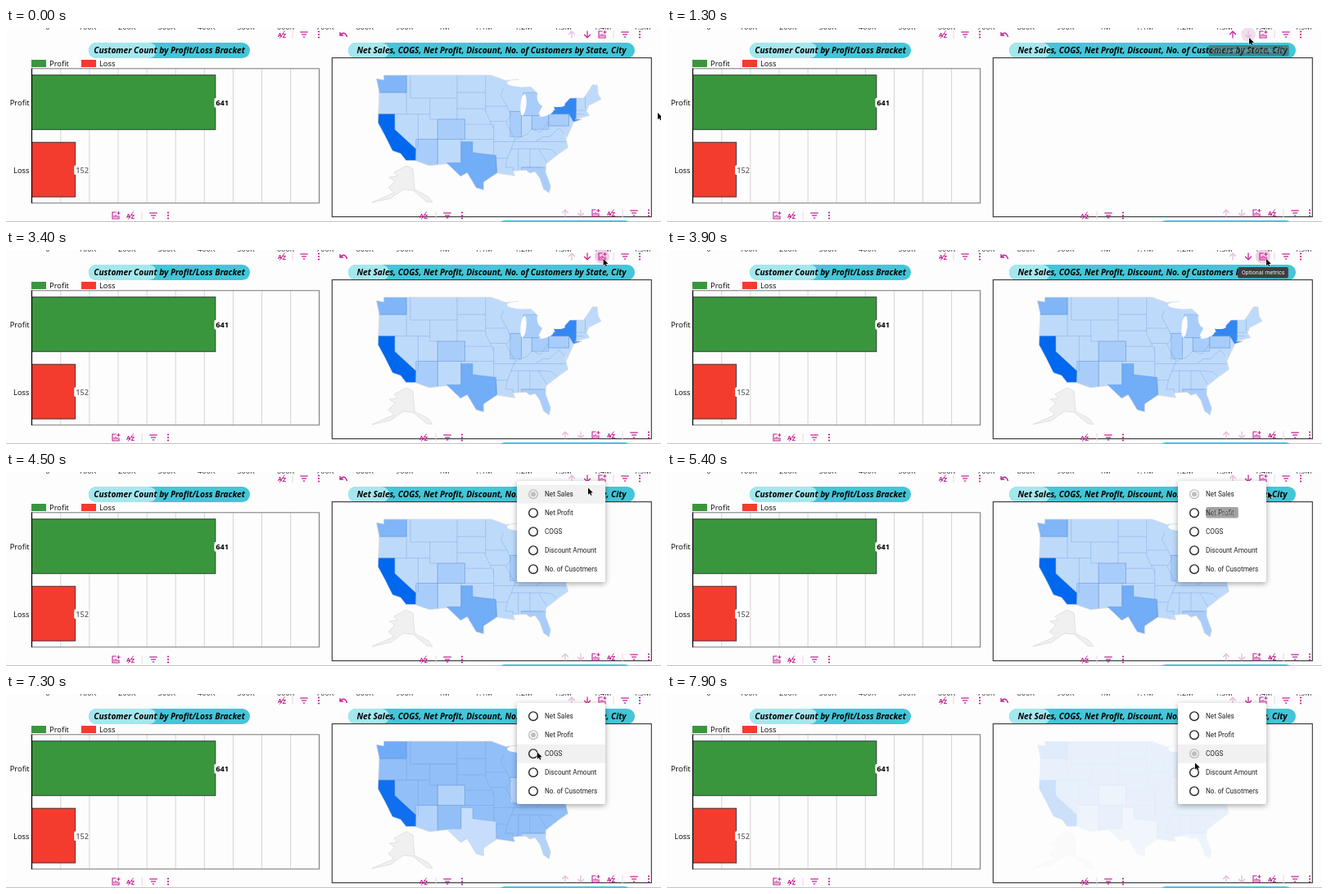
An HTML page with a canvas that plays this animation: 800 px wide and 238 px high, repeating every 8000 ms.

```html
<!DOCTYPE html>
<html lang="en">
<head>
<meta charset="utf-8">
<title>Sales dashboard</title>
<style>
html, body { margin: 0; width: 800px; height: 238px; overflow: hidden; background: #fff; }
canvas { display: block; width: 800px; height: 238px; }
</style>
</head>
<body>
<canvas id="stage"></canvas>
<script>
const W = 800, H = 238, LOOP = 8000, STEP = 100;
const PINK = '#c2188f', PALE = '#eab4d8';
const SANS = '"Open Sans", "Noto Sans", sans-serif', UI = 'Roboto, sans-serif';
const dpr = window.devicePixelRatio || 1;
const clamp = v => Math.max(0, Math.min(1, v));
const ease = u => u * u * (3 - 2 * u);

function sized(canvas) {
  canvas.width = W * dpr;
  canvas.height = H * dpr;
  const c = canvas.getContext('2d');
  c.scale(dpr, dpr);
  return c;
}
const g = sized(document.getElementById('stage'));

// ---------- map: Mercator, points are longitude, latitude ----------
const merc = lat => Math.log(Math.tan(Math.PI / 4 + lat * Math.PI / 360));
const geoX = lon => 1045.7 + 4.757 * lon;
const geoY = lat => 58 + (0.9838 - merc(lat)) * 272.6;

function geoPath(list, close) {
  const p = new Path2D();
  for (let i = 0; i < list.length; i += 2) p.lineTo(geoX(list[i]), geoY(list[i + 1]));
  if (close) p.closePath();
  return p;
}
const box = (w, s, e, n) => [w, s, w, n, e, n, e, s];

const northEdge = [-124.7,48.4, -122.8,48.2, -122.8,49, -95.2,49, -91.5,48.1, -88.4,48.3, -84.9,46.9,
  -82.5,45.3, -82.1,43.6, -83.1,42.1, -82.5,41.7, -78.9,42.8, -79.2,43.4, -76.8,43.6, -75,45, -71.5,45,
  -69.2,47.4, -68,47.3, -67.8,45.7, -67,44.8];
const coast = [-70.2,43.6, -70.8,42.6, -70,41.7, -73.7,41, -72,41, -74,40.5, -74.9,39, -75.9,37.2,
  -76.4,39, -76,36.8, -75.5,35.3, -77.9,33.9, -81.2,31.7, -81.3,29.9, -80,26.8, -80.4,25.2, -81.8,26.1,
  -82.7,28.5, -84,30.1, -85.3,29.7, -86.3,30.4, -89.6,30.2, -89.2,29.1, -93.8,29.7, -97.2,27.7,
  -97.2,25.9, -99.1,26.4, -101.4,29.8, -103.1,29, -106.5,31.8, -111.1,31.4, -114.8,32.5, -117.1,32.5,
  -118.5,34, -120.6,34.6, -122.5,37.7, -124.3,40.3, -124,46.2];
const land = geoPath([...northEdge, ...coast], true);
const alaska = new Path2D('M489 169L474 177 478 182 468 183 475 188 467 196 474 202 447 214 470 209 485 198 ' +
  '497 199 514 213 521 214 516 207 499 198 497 173Z');

// Shapes run past the coast and are clipped by the land.
const states = {
  mid: [box(-109, 37, -102, 41), box(-114.6, 31, -109, 37), box(-90.4, 37.5, -87.5, 42.5),
    box(-84.8, 39, -80.5, 42), box(-80.5, 39.7, -75.3, 42), box(-87.5, 25, -79, 31), box(-87, 41.7, -82, 46)],
  CA: [[-126,42, -120,42, -120,39, -114.6,35, -114.7,32.3, -122,32]],
  TX: [[-106.6,32, -103,32, -103,36.5, -100,36.5, -100,34.2, -94,33.6, -93.7,29, -97,25, -107,28]],
  NY: [[-79.8,42, -79.8,44, -75,45.1, -73.4,45, -73.5,41, -71.8,41.2, -72,40.4, -74.1,40.5, -75.3,42]],
  WA: [box(-125, 46, -117, 49.2)]
};
const palettes = {
  sales: { base: '#bedafb', mid: '#a9cdfa', CA: '#0068ee', TX: '#72adf7', NY: '#3487f1', WA: '#80b6f7' },
  profit: { base: '#92bff8', mid: '#b4d3fa', CA: '#0f6fee', TX: '#c6ddfc', NY: '#1d79ef', WA: '#70abf6' }
};

// Straight borders: latitude, west, east and longitude, south, north.
const parallels = [[46,-124,-117], [42,-124.3,-111], [45,-116,-104], [41,-111,-102], [37,-114,-94.6],
  [46,-104,-96.7], [43,-104,-96.7], [40,-102,-95.3], [43.5,-96.7,-91.2], [40.6,-95.5,-91.4],
  [42.5,-90.6,-87.7], [36.5,-94.6,-76], [35,-90.2,-82], [33,-94,-91.1], [31,-87.5,-82],
  [41.7,-87,-83.2], [42,-79.8,-71.5], [42.7,-73.4,-70.8], [39.7,-80.5,-75.3]];
const meridians = [[-117,42,49], [-114,35,42], [-111,41,45], [-116,45,49], [-109,31.4,41], [-104,41,49],
  [-102,37,41], [-103,32,37], [-96.7,42.5,49], [-94.6,33.6,40], [-94,29.8,33], [-87.5,38,41.7],
  [-84.8,39,41.7], [-80.5,39.7,42], [-88.3,30.3,35], [-85.3,31,35], [-75.3,39.6,42], [-73.4,41,45], [-71.1,43,45.2]];
const rivers = [
  [-92.1,46.7, -92.8,45.5, -91.2,43.5, -90.2,41.8, -91.4,40.3, -89.1,37, -91.1,33, -91.6,31, -89.7,31, -89.6,30.2],
  [-89.1,37, -86,38, -84.8,39.1, -82.6,38.4, -80.5,40.6], [-83.7,36.6, -82,37.5, -80.3,37.5, -77.8,39.3, -76.4,38],
  [-83.1,35, -81,32.1], [-82,35, -79.7,34.8, -78.6,33.9], [-96.7,42.5, -94.6,39.1]];
// x, y, half width, half height, tilt
const lakes = [[629, 68, 17, 4.5, 0.05], [632, 94, 3.5, 13, 0.1], [654, 87, 5, 9, -0.3], [660, 105, 9, 2.3, -0.35], [676, 95, 7, 2, -0.1]];

function layer(draw) {
  const canvas = document.createElement('canvas');
  draw(sized(canvas));
  return canvas;
}

function shape(c, path, fill, edge) {
  c.fillStyle = fill;
  c.fill(path);
  c.strokeStyle = edge;
  c.lineWidth = 0.6;
  c.stroke(path);
}

function stateMap(c, colors) {
  const edge = 'rgba(95,145,210,.55)';
  shape(c, alaska, '#f0f0f0', '#d2d2d2');
  c.save();
  c.clip(land);
  c.fillStyle = colors.base;
  c.fill(land);
  for (const name in states) for (const ring of states[name]) shape(c, geoPath(ring, true), colors[name], edge);
  c.strokeStyle = edge;
  const lines = [...parallels.map(([y, w, e]) => [w, y, e, y]), ...meridians.map(([x, s, n]) => [x, s, x, n]), ...rivers];
  for (const l of lines) c.stroke(geoPath(l));
  c.restore();
  c.stroke(land);
  c.fillStyle = '#fdfdfd';
  for (const [x, y, rx, ry, tilt] of lakes) {
    c.beginPath();
    c.ellipse(x, y, rx, ry, tilt, 0, 7);
    c.fill();
  }
}

function cityMap(c) {
  shape(c, alaska, '#f0f0f0', '#d2d2d2');
  shape(c, land, '#efefef', '#d8d8d8');
  let seed = 11;
  const rnd = () => (seed = (seed * 16807) % 2147483647) / 2147483647;
  const dot = (x, y, r, fill, edge) => {
    const p = new Path2D();
    p.arc(x, y, r, 0, 7);
    shape(c, p, fill, edge);
  };
  const small = (x, y) => dot(x, y, 2.2, 'rgba(190,213,240,.8)', 'rgba(125,155,195,.75)');
  for (let n = 0; n < 230;) {
    const lon = -124 + rnd() * 55, lat = 26 + rnd() * 22;
    const chance = lon > -97 ? (lat < 45 ? 0.8 : 0.15) : lon < -118 ? 0.35 : 0.16;
    const x = geoX(lon), y = geoY(lat);
    if (rnd() < chance && c.isPointInPath(land, x * dpr, y * dpr)) { small(x, y); n++; }
  }
  const hubs = [[693, 113, 6, '#0a69ea'], [482, 153, 5, '#2f83ee'], [462, 131, 4, '#6aa8f3'], [462, 68, 4, '#82b6f5']];
  for (const [x, y, r, fill] of hubs) {
    dot(x, y, r, fill, '#4c82c4');
    for (let k = 0; k < 6; k++) small(x + Math.cos(k * 2.4) * k, y + Math.sin(k * 2.4) * k);
  }
}

const maps = {
  sales: layer(c => stateMap(c, palettes.sales)),
  profit: layer(c => stateMap(c, palettes.profit)),
  city: layer(cityMap)
};
// start, layer, opacity
const mapTimes = [[0, 'sales', 1], [1000, 'sales', 0.2], [1200, null, 0], [1800, 'city', 1], [2800, null, 0],
  [3300, 'sales', 1], [6400, 'sales', 0.2], [6900, 'profit', 1], [7500, 'profit', 0.2]];

// ---------- drawing helpers ----------
function rect(x, y, w, h, fill) { g.fillStyle = fill; g.fillRect(x, y, w, h); }

function round(x, y, w, h, r, fill) {
  g.beginPath();
  g.roundRect(x, y, w, h, r);
  g.fillStyle = fill;
  g.fill();
}

function frame(x, y, w, h, color, width) {
  g.strokeStyle = color;
  g.lineWidth = width;
  g.strokeRect(x, y, w, h);
}

function line(color, width, ...pts) {
  g.beginPath();
  for (let i = 0; i < pts.length; i += 2) g.lineTo(pts[i], pts[i + 1]);
  g.strokeStyle = color;
  g.lineWidth = width;
  g.stroke();
}

function circle(x, y, r, fill, stroke, width) {
  g.beginPath();
  g.arc(x, y, r, 0, 7);
  if (fill) { g.fillStyle = fill; g.fill(); }
  if (stroke) { g.strokeStyle = stroke; g.lineWidth = width; g.stroke(); }
}

function text(s, x, y, font, color = '#000', align = 'left') {
  g.font = font;
  g.fillStyle = color;
  g.textAlign = align;
  g.fillText(s, x, y);
}

function arrow(x, y, c, dir) {
  line(c, 1.2, x, y - 4.5 * dir, x, y + 3.5 * dir);
  line(c, 1.2, x - 3.8, y, x, y + 4 * dir, x + 3.8, y);
}

const icons = {
  up: (x, y, c) => arrow(x, y, c, -1),
  down: (x, y, c) => arrow(x, y, c, 1),
  filter(x, y, c) {
    line('#ead6e4', 1, x - 14, y - 5, x - 14, y + 5);
    for (const d of [-1, 0, 1]) line(c, 1.2, x - 3 + d * 1.75, y + d * 3, x + 3 - d * 1.75, y + d * 3);
  },
  dots(x, y, c) { for (const d of [-3.5, 0, 3.5]) circle(x, y + d, 1.1, c); },
  sort(x, y, c) {
    text('A', x - 5, y + 2.5, 'bold 7.5px ' + UI, c);
    text('Z', x + 0.6, y + 3.5, 'bold 7.5px ' + UI, c);
    line(c, 0.9, x - 3, y + 4.8, x + 3.5, y - 4.5);
  },
  metrics(x, y, c) {
    line(c, 1.1, x + 0.5, y - 4, x - 4, y - 4, x - 4, y + 4, x + 4, y + 4, x + 4, y + 0.5);
    for (const d of [-2, 0, 2]) line(c, 1.1, x + d, y + 2.5, x + d, y - 1 + Math.abs(d) / 2);
    line(c, 1, x + 3.4, y - 5, x + 3.4, y - 0.8);
    line(c, 1, x + 1.3, y - 2.9, x + 5.5, y - 2.9);
  },
  undo(x, y, c) {
    g.beginPath();
    g.moveTo(x - 4, y + 0.5);
    g.quadraticCurveTo(x + 2, y - 5, x + 4.5, y + 3);
    g.strokeStyle = c;
    g.lineWidth = 1.3;
    g.stroke();
    line(c, 1.3, x - 4, y - 3, x - 4, y + 1, x, y + 1);
  }
};

// The last icons of every toolbar share their spacing; x is the right end.
function toolbar(x, y, { sort = 0, metrics = 0, arrows = null }) {
  icons.dots(x, y, PINK);
  icons.filter(x - 18, y, PINK);
  if (sort) icons.sort(x - sort, y, PINK);
  if (metrics) icons.metrics(x - metrics, y, PINK);
  if (arrows) {
    icons.up(x - metrics - 37, y, arrows[0]);
    icons.down(x - metrics - 18, y, arrows[1]);
  }
}

function title(s, x, w, light) {
  round(x, 18, w, 19, 9.5, '#43c6d8');
  round(x, 18, light, 19, 9.5, '#a5e7ee');
  text(s, x + w / 2, 31, 'italic bold 10.15px ' + SANS, '#000', 'center');
}

function bar(name, y, count, color, weight, ink) {
  const w = count * 0.35;
  rect(31.5, y, w, 67, color);
  frame(31.5, y, w, 67, 'rgba(15,25,30,.75)', 1);
  round(30 + w, y + 28, 18, 12, 2, '#fff');
  text(count, 32 + w, y + 37.3, weight + ' 9.2px ' + SANS, ink);
  text(name, 28.5, y + 37.3, '9.4px ' + SANS, '#000', 'right');
}

function barChart() {
  title('Customer Count by Profit/Loss Bracket', 101, 197, 83);
  [['Profit', 31, '#3a963c'], ['Loss', 92, '#f33b2e']].forEach(([s, x, color]) => {
    rect(x, 39, 18, 9, color);
    text(s, x + 22, 47, '9.4px ' + SANS);
  });
  for (let i = 1; i < 10; i++) line('#d4d4d4', 1, 31.7 + i * 35.1, 50, 31.7 + i * 35.1, 215);
  frame(31.5, 49.8, 351, 165, '#777', 1);
  bar('Profit', 57.7, 641, '#3a963c', 'bold', '#000');
  bar('Loss', 140.2, 152, '#f33b2e', '600', '#666');
  line('#000', 1.2, 31.5, 49.5, 31.5, 215);
}

function axis() {
  for (let i = 0; i < 16; i++) {
    const s = i === 0 ? '0' : i < 10 ? i + '00K' : i === 10 ? '1M' : '1.' + (i - 10) + 'M';
    text(s, 51 + i * 48.4, 1.7, '9.2px ' + SANS, '#333', 'center');
  }
}

// ---------- interaction ----------
// rests of the pointer: from, to, x, y
const rests = [[0, 200, 796, 104], [900, 1500, 711, 12], [2100, 2900, 700, 11], [3500, 4300, 732, 11],
  [4700, 5100, 690, 28], [5400, 5600, 734, 24], [6200, 6900, 657, 50], [7400, 7600, 648, 74], [7900, 8000, 645, 84.4]];

function pointerAt(t) {
  const i = rests.findIndex(r => t <= r[1]);
  const [from, , x, y] = rests[i], [, left, px, py] = rests[Math.max(0, i - 1)];
  const k = t >= from ? 1 : ease((t - left) / (from - left));
  return [px + (x - px) * k, py + (y - py) * k];
}

function pointer(x, y) {
  g.save();
  g.translate(x, y);
  const p = new Path2D('M0 0L0 8.2 1.9 6.5 3.2 9.3 4.5 8.7 3.2 6 5.8 5.8Z');
  g.strokeStyle = '#fff';
  g.lineWidth = 1;
  g.stroke(p);
  g.fillStyle = '#000';
  g.fill(p);
  g.restore();
}

const tips = [['Drill down from State to City', 710.5, 21, 900, 1400], ['Drill up from City to State', 691.5, 21, 2100, 2900],
  ['Optional metrics', 728, 21, 3500, 4400], ['Net Sales', 678, 43, 4800, 5500]];

function tooltips(t) {
  const font = '7.2px ' + UI;
  for (const [s, cx, y, from, to] of tips) {
    g.globalAlpha = clamp((t - from) / 200) * clamp((to - t) / 200);
    g.font = font;
    const w = g.measureText(s).width + 9;
    round(cx - w / 2, y, w, 13.5, 2, 'rgba(60,60,60,.95)');
    text(s, cx, y + 9.4, font, '#eee', 'center');
  }
  g.globalAlpha = 1;
}

function menu(t, px, py) {
  if (t < 4400) return;
  const chosen = t < 6400 ? 0 : t < 7500 ? 1 : 2;
  const over = px > 624 && px < 732 ? Math.round((py - 27.2) / 23) : -1;
  g.save();
  g.shadowColor = 'rgba(0,0,0,.35)';
  g.shadowBlur = 7 * dpr;
  g.shadowOffsetY = 2 * dpr;
  round(624, 11, 108, 124, 2, '#fff');
  g.restore();
  ['Net Sales', 'Net Profit', 'COGS', 'Discount Amount', 'No. of Cusotmers'].forEach((s, i) => {
    const y = 27.2 + i * 23;
    if (i === over) rect(624, y - 11.4, 108, 22.8, '#f1f1f1');
    if (i === chosen) circle(644, y, 3, '#bdbdbd');
    circle(644, y, 5.3, null, i === chosen ? '#bdbdbd' : '#222', 1.4);
    text(s, 658, y + 3, '8.2px ' + UI, '#222');
  });
}

function mapChart(t) {
  title('Net Sales, COGS, Net Profit, Discount, No. of Customers by State, City', 418, 350, 50);
  const [, name, alpha] = mapTimes.filter(m => m[0] <= t).pop();
  if (name) {
    g.globalAlpha = alpha;
    g.drawImage(maps[name], 0, 0, W, H);
    g.globalAlpha = 1;
  }
  frame(398.3, 36.6, 390, 195, '#333', 1.1);
}

function tools(t) {
  const glow = t >= 800 && t < 1900 ? 710 : t >= 2000 && t < 3000 ? 691 : t >= 3400 && t < 4400 ? 728 : 0;
  if (glow) circle(glow, 8, 9, glow === 710 ? '#f1e0ec' : '#f0cce4');
  const drilled = t >= 1200 && t < 2900;
  toolbar(382, 8, { sort: 45 });
  icons.undo(412, 8, PINK);
  toolbar(774, 8, { metrics: 46, arrows: drilled ? [PINK, PALE] : [PALE, PINK] });
  toolbar(198, 230, { sort: 46, metrics: 64 });
  toolbar(557, 230, { sort: 47 });
  toolbar(785, 227, { sort: 46, metrics: 65, arrows: [PALE, PALE] });
}

function draw(t) {
  rect(0, 0, W, H, '#fdfdfd');
  axis();
  barChart();
  mapChart(t);
  line('#c4c4c4', 1, 0, 237.5, W, 237.5);
  round(600, 236, 165, 19, 9.5, '#43c6d8');
  tools(t);
  const [x, y] = pointerAt(t);
  menu(t, x, y);
  tooltips(t);
  pointer(x, y);
}

const start = performance.now();
function tick(now) {
  const t = Math.max(0, now - start) % LOOP;
  draw(Math.floor(t / STEP) * STEP);
  requestAnimationFrame(tick);
}
draw(0);
requestAnimationFrame(tick);
</script>
</body>
</html>
```
